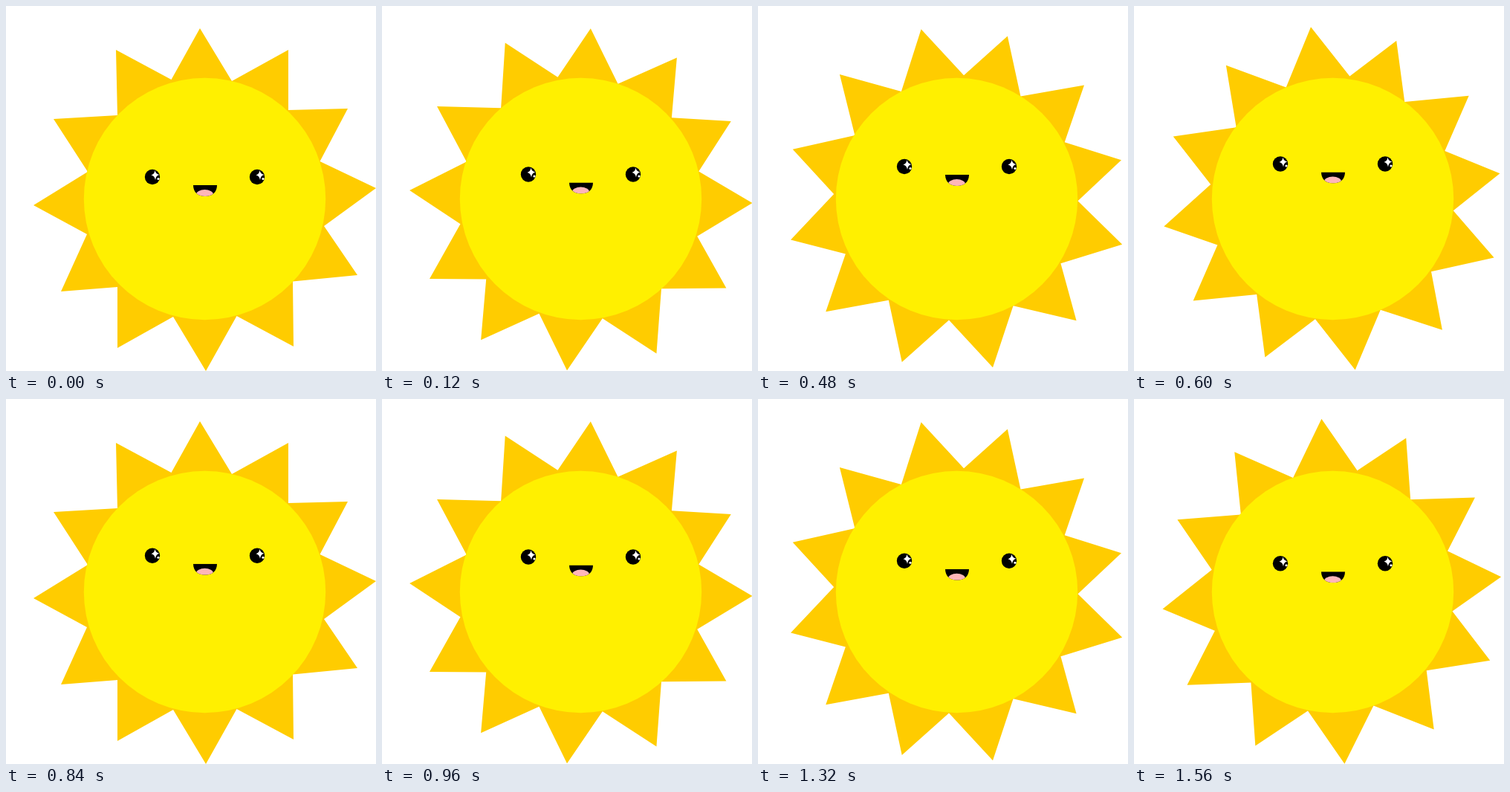
These frames come from a looping animation (498x491 px, 1680 ms). An HTML page:

```html
<!DOCTYPE html>
<html lang="en">
<head>
<meta charset="utf-8">
<title>Sun</title>
<style>
  html, body { margin: 0; width: 100%; height: 100%; overflow: hidden; background: #fff; }
  svg { display: block; width: 498px; height: 491px; }
</style>
</head>
<body>
<svg viewBox="0 0 498 491">
  <defs>
    <clipPath id="lips"><path d="M252 241H284C284 251 277 256 268 256S252 251 252 241Z"/></clipPath>
    <g id="eye">
      <circle r="10.2"/>
      <path fill="#fff" d="M3.5-9Q4.2-4 9.5-3Q4.7-2 4 4Q3-1.600-1.500-2.500Q2.900-4 3.500-9Z"/>
      <circle cx="8" cy="2.500" r="1.600" fill="#fff"/>
    </g>
  </defs>
  <polygon id="rays" fill="#ffcc00"/>
  <circle cx="267.5" cy="259.5" r="162.700" fill="#fff000"/>
  <g id="face">
    <use href="#eye" x="197" y="230"/>
    <use href="#eye" x="338" y="230"/>
    <g clip-path="url(#lips)">
      <rect x="250" y="240" width="36" height="18"/>
      <ellipse cx="267.5" cy="253.500" rx="11.500" ry="6.500" fill="#ffb6b9"/>
    </g>
  </g>
</svg>
<script>
const STEP = 120, STEPS = 14;
const TURN = [0, 4.95, 9.7, 14.3, 18.95, 23.55, 27.1];

// hand-cut outline: tip, valley, tip, valley, clockwise from the top
const outline = [
  [261, 30], [304, 101], [380, 59], [380, 140], [460, 138], [422.5, 209],
  [498, 245], [428, 296], [473, 362], [386, 370.5], [387, 458], [310.5, 417],
  [269, 491], [225, 418], [150, 460], [150, 378], [74, 384], [109, 307],
  [37, 268], [110, 223], [64, 152], [150, 147], [148, 59], [222.5, 99]
];

const rays = document.getElementById('rays');
const face = document.getElementById('face');
rays.setAttribute('points', outline.join(' '));

// quick rise for six steps, then a sink at half the speed
const lift = k => k <= 6 ? -3.5 * k : -21 + 1.75 * (k - 6);

function draw(now) {
  const k = Math.floor(now / STEP) % STEPS;
  rays.setAttribute('transform', `rotate(${TURN[k % TURN.length]} 267 259.5)`);
  face.setAttribute('transform', `translate(0 ${lift(k)})`);
}

let start;
function tick(now) {
  start ??= now;
  draw(now - start);
  requestAnimationFrame(tick);
}
draw(0);
requestAnimationFrame(tick);
</script>
</body>
</html>
```
